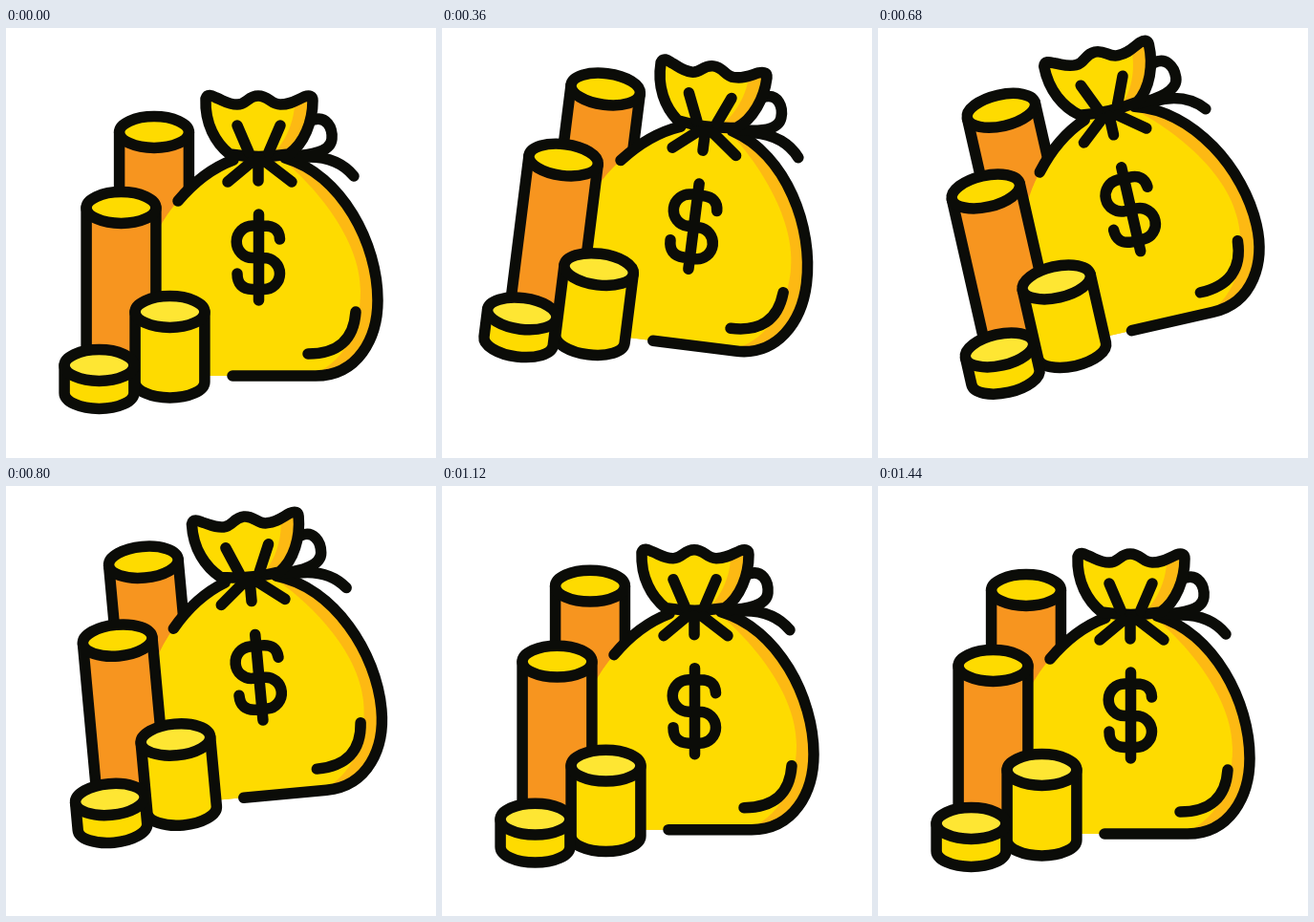
Recreate the animation shown at these times as an HTML page. Size 450 px wide and 450 px high, loop 1.48 s.

```html
<!DOCTYPE html>
<html lang="en">
<head>
<meta charset="utf-8">
<title>Money bag</title>
<style>
  html, body { margin: 0; width: 100%; height: 100%; overflow: hidden; background: #fff; }
  svg { display: block; width: 100vw; height: 100vh; }
  .line { fill: none; }
  .shade { fill: #fdb913; stroke: none; }
  .gold { fill: #fedb00; stroke: none; }
</style>
</head>
<body>
<svg viewBox="0 0 450 450">
  <g id="art" stroke="#0b0c08" stroke-width="11.5" stroke-linecap="round" stroke-linejoin="round">
    <g id="back"></g>

    <!-- bag body -->
    <path class="shade" d="M238 137Q206 150 180 181Q167 196 159 212V364H324C368 364 389 325 389 285C389 226 352 154 292 136Z"/>
    <path class="gold" d="M238 137Q206 150 180 181Q167 196 159 212V364H318C352 352 371 318 371 275C371 220 322 165 292 140Z"/>
    <path class="line" d="M180 181Q206 150 238 138M292 136C352 154 389 226 389 285C389 325 368 364 324 364H237"/>
    <path class="line" d="M366 297Q363 341 316 341"/>

    <!-- cord -->
    <path class="line" d="M322 96C335 92 342 104 341 116C340 128 324 133 297 134M314 135Q347 134 364 155"/>

    <!-- gathered top -->
    <path class="shade" d="M209 74C211 68 216 71 220 73C228 76 232 80 242 80C252 80 253 71 264 71S277 80 287 80C298 80 303 76 312 72Q321 69 321 76C321 98 312 121 296 132Q264 137 234 132C219 120 208 100 209 74Z"/>
    <path class="gold" d="M209 74C211 68 216 71 220 73C228 76 232 80 242 80C252 80 253 71 264 71S277 80 287 80Q297 80 302 78C302 100 290 124 276 134H234C219 120 208 100 209 74Z"/>
    <path class="line" d="M234 132C219 120 208 100 209 74C211 68 216 71 220 73C228 76 232 80 242 80C252 80 253 71 264 71S277 80 287 80C298 80 303 76 312 72Q321 69 321 76C321 98 312 121 296 132Q264 137 234 132"/>
    <path class="line" d="M242 102L254 130M287 102L275 130M232 161L256 141M264 140V160M273 141L299 161"/>

    <!-- dollar sign -->
    <path class="line" d="M264.500 195V285M286.500 221Q286 207 270 207H258a16.500 16.500 0 0 0 0 33.500H270a16.500 16.500 0 0 1 0 33H258Q242 273 242 257"/>

    <g id="front"></g>
  </g>
</svg>
<script>
  const FRAME = 40, LOOP = 1480;
  const art = document.getElementById('art');

  function cylinder(layer, x, top, bottom, side, lid) {
    const rx = 36.4, ry = 16.4, left = x - rx, right = x + rx;
    document.getElementById(layer).innerHTML +=
      `<path fill="${side}" d="M${left} ${top}V${bottom}A${rx} ${ry} 0 0 0 ${right} ${bottom}V${top}"/>` +
      `<ellipse fill="${lid}" cx="${x}" cy="${top}" rx="${rx}" ry="${ry}"/>`;
  }
  const orange = '#f7951f', gold = '#fedb00', pale = '#fee633';
  cylinder('back', 155, 109, 235, orange, gold);
  cylinder('front', 120.5, 188, 335, orange, gold);
  cylinder('front', 171.5, 297, 370.5, gold, pale);
  cylinder('front', 97.5, 353, 382, gold, pale);

  function bezier(x1, y1, x2, y2) {
    const at = (a, b, s) => 3 * a * s * (1 - s) ** 2 + 3 * b * s * s * (1 - s) + s ** 3;
    return x => {
      let lo = 0, hi = 1;
      for (let i = 0; i < 24; i++) {
        const mid = (lo + hi) / 2;
        if (at(x1, x2, mid) < x) lo = mid; else hi = mid;
      }
      return at(y1, y2, lo);
    };
  }

  const swing = bezier(.55, 0, .45, 1);
  // Each key: [time, value, easing towards it]
  const tilt = [[0, 0], [280, 9.3, swing], [600, -13.8, swing], [960, 0, swing]];
  const lift = [[0, 0], [600, -42, bezier(.2, .2, .3, 1)], [1440, 0, bezier(.5, 0, .15, 1)]];

  function valueAt(keys, t) {
    const i = keys.findIndex(key => key[0] > t);
    if (i < 0) return keys[keys.length - 1][1];
    const [t0, v0] = keys[i - 1], [t1, v1, ease] = keys[i];
    return v0 + (v1 - v0) * ease((t - t0) / (t1 - t0));
  }

  const start = performance.now();
  function draw() {
    const elapsed = (performance.now() - start) % LOOP;
    const t = Math.floor(elapsed / FRAME) * FRAME;
    art.setAttribute('transform',
      `translate(0 ${valueAt(lift, t)}) rotate(${valueAt(tilt, t)} 225 234.5)`);
    requestAnimationFrame(draw);
  }
  draw();
</script>
</body>
</html>
```
